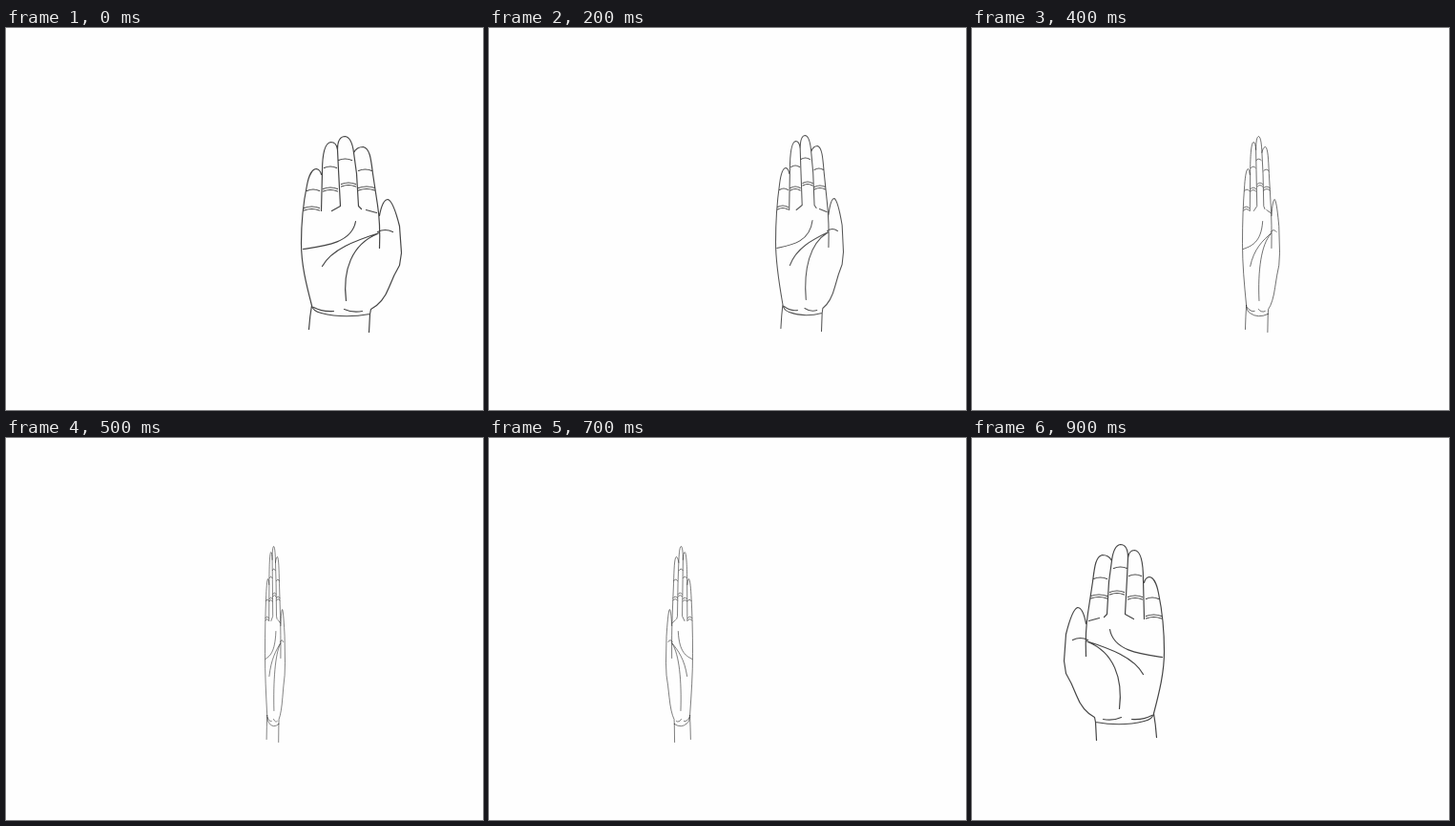
These frames come from a looping animation (500 by 400 pixels, 1 s). An HTML page with a canvas:

```html
<!DOCTYPE html>
<html lang="en">
<head>
<meta charset="utf-8">
<title>Turning hand</title>
<style>
  html, body { margin: 0; width: 100%; height: 100%; overflow: hidden; background: #fefefe; }
  canvas { display: block; width: 500px; height: 400px; }
</style>
</head>
<body>
<canvas id="stage" width="500" height="400"></canvas>
<script>
const ctx = document.getElementById('stage').getContext('2d');
const STEP = 100;
const LEFT = 309;   // little-finger edge of the open palm
const SPAN = 105;   // from there to the thumb edge

// Each pose: x of the little-finger edge, x of the thumb edge, vertical shift
const poses = [
  [309, 414, 0], [305, 394, 0], [300, 371, -1], [294, 350, 0], [283, 322, 0],
  [271, 292, 0], [222, 210, 0], [213, 185, 0], [207, 141, -1], [201, 96, -2]
];

const outline = [
  // palm edge and little finger
  'M320 290C314 267 309 247 309 225C309 203 311 183 315 164C317 153 321 147 325 147Q329 148 330 153',
  // ring finger
  'M330 191L331 150C331 136 333 120 340 119Q346 119 347 127',
  // middle finger
  'M341 191L350 186L348 148L347 127C347 118 350 113 355 113C361 114 363 122 364 130',
  // index finger down to the thumb root
  'M372 189L369 186L367 152L364 130C366 126 370 124 374 124C381 126 382 136 384 152L389 185Q392 204 391 230',
  // thumb and the heel of the hand
  'M391 196C393 185 396 179 400 179C405 181 409 195 412 207L414 235L412 248Q406 258 401 271Q395 287 382 294L381 299',
  // wrist
  'M320 290Q321 296 330 298Q353 304 381 299',
  'M320 290Q318 301 317 315',
  'M381 299L380 318'
];

const palm = [
  'M311 231C332 228 362 225 366 202',
  'M331 249C341 231 366 222 391 214',
  'M389 215C362 226 352 253 356 285',
  'M389 213Q397 209 405 213',
  'M377 190L388 193',
  'M322 292Q331 297 343 296',
  'M354 294Q363 298 373 296'
];

// Finger creases: x, y, width, number of lines
const creases = [
  [315, 170, 13, 1], [312, 188, 16, 2],
  [333, 146, 13, 1], [332, 168, 15, 2],
  [348, 138, 14, 1], [351, 163, 15, 2],
  [369, 149, 14, 1], [369, 167, 17, 2]
];

const hand = new Path2D([...outline, ...palm].join(''));
for (const [x, y, w, lines] of creases) {
  for (let i = 0; i < lines; i++) {
    hand.addPath(new Path2D(`M${x} ${y + i * 2.5}q${w / 2} -3 ${w} 0`));
  }
}

function draw([edge, thumb, dy]) {
  const s = (thumb - edge) / SPAN;
  const open = Math.abs(s);
  const turned = new Path2D();
  turned.addPath(hand, new DOMMatrix([s, 0, 0, 1, edge - s * LEFT + 0.5, dy + 0.5]));

  ctx.fillStyle = '#fefefe';
  ctx.fillRect(0, 0, 500, 400);
  ctx.lineCap = ctx.lineJoin = 'round';
  ctx.lineWidth = 0.75 + 0.45 * open;
  ctx.strokeStyle = `rgba(30, 30, 30, ${0.6 + 0.22 * open})`;
  ctx.stroke(turned);
}

const start = performance.now();
function tick() {
  const t = performance.now() - start;
  draw(poses[Math.floor(t / STEP) % poses.length]);
  requestAnimationFrame(tick);
}
tick();
</script>
</body>
</html>
```
